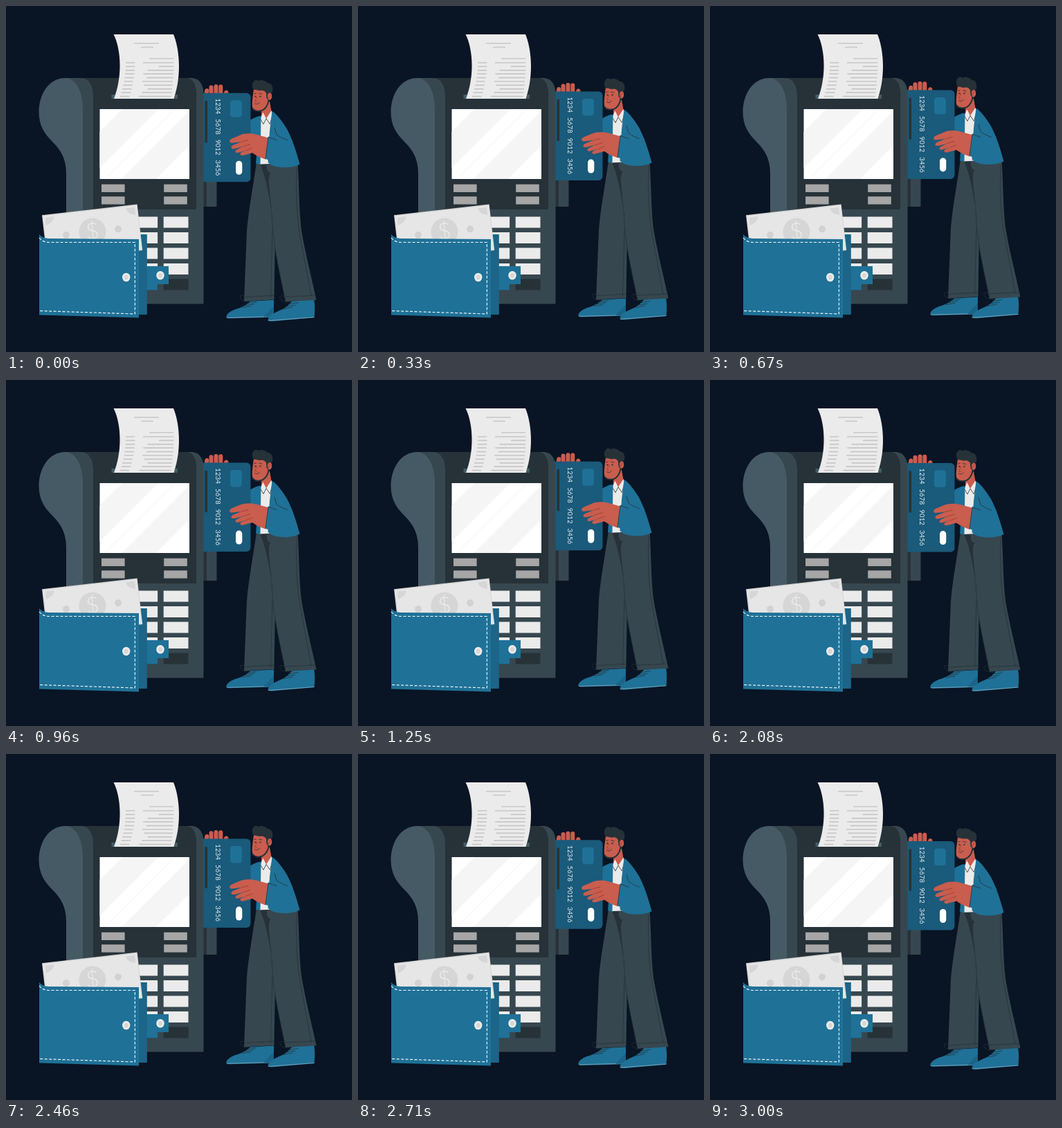
An HTML page for the animation above (3.04 s loop, 500 by 500 pixels).

```html
<!DOCTYPE html>
<html lang="en">
<head>
<meta charset="utf-8">
<title>Card payment</title>
<style>
  html, body { margin: 0; width: 100%; height: 100%; overflow: hidden; background: #091424; }
  svg { display: block; width: 100%; height: 100%; }
  .teal { fill: #1f7197; }
  .deep { fill: #1a5a7a; }
  .slate { fill: #37474f; }
  .dark { fill: #263238; }
  .pale { fill: #ebebeb; }
  .skin { fill: #c95d4e; }
  .line { fill: none; stroke: #263238; stroke-width: .8; stroke-linecap: round; stroke-linejoin: round; }
  .crease { fill: none; stroke: #8f3a33; stroke-width: .7; stroke-linecap: round; }
  .sole { fill: none; stroke: #a9c3d0; stroke-width: .6; }
  .number { font: 400 9.5px Lato, "Open Sans", sans-serif; letter-spacing: .2px; word-spacing: 4.2px; fill: #e4eef3; }
</style>
</head>
<body>
<svg viewBox="0 0 500 500">
  <defs>
    <clipPath id="glass"><rect x="135.500" y="149" width="129.500" height="101"/></clipPath>
  </defs>

  <!-- card reader arm -->
  <path class="slate" d="M285 200H304.500V290H285Z"/>
  <path class="dark" d="M285 200H290V290H285Z"/>

  <g id="man">
    <!-- shoes -->
    <path class="teal" d="M318.500 450.500C317 446 325 440 335 437.500C343 435 349 431 353 427L387 425V450L322 451.800Z"/>
    <path class="sole" d="M319 450.800L387 449"/>
    <path d="M372 449.500L387 434V449.500Z" fill="#1b6488"/>
    <path class="teal" d="M378.500 455C378 449 387 443.500 396 440C404 437 410 431 413 427L445 424C447 434 446 445 445.500 450.500L384 456Z"/>
    <path class="sole" d="M379 455L445.500 450"/>
    <path class="line" d="M341 436L354 434M345 433L358 431M349 430L362 428M347 427C337 426 337 418 341 418.500S348 424 350 428M401 438L414 435.500M405 434.500L418 432.500M409 431L422 429M405 428C394 427 394 418 399 419S406 425 408 429"/>

    <!-- trousers -->
    <path class="slate" d="M362 226L392 228L389 330L387.500 424.500L344 427L348 325C351 292 357 262 362 226Z"/>
    <path class="line" d="M385 325L382.500 421M345 421L387.500 418.500"/>
    <path class="slate" d="M366 226L421.500 227C424 262 423 290 427 325C433 360 442 394 448.500 425L404 427.500C397 392 387 350 385.500 322C382 290 379 252 366 226Z"/>
    <path class="dark" d="M367 228L377 230C376 236 378 240 383 242C376 245 383 275 384.500 305C381 276 376 250 367 228Z"/>
    <path class="line" d="M384 300L385.500 322C387 350 397 392 404 427.500M420 234C419 270 420 300 424 327L441 419M403 420.500L447 418.500"/>

    <!-- neck, shirt and jacket -->
    <path class="skin" d="M369 145L381 138L384 155L376 165L369 160Z"/>
    <path class="pale" d="M367 164L371.500 154L376 163L383.500 151.500L389 165L384 228L366 229Z"/>
    <path class="line" d="M367.500 163L372 171L376 163L381.500 171L385.500 156" stroke-width=".6"/>
    <path class="teal" d="M368.500 159C361 160 356 163 350 167V190L364 190L361 228L367.500 229.500Z"/>
    <path class="teal" d="M384.500 152C392 157 400 168 406 178C414 193 420 212 424.500 229C416 233 409 234 400 233.500C390 233 383 231 378.500 226L381 181Z"/>

    <!-- head -->
    <path class="skin" d="M358 119C357 130 354.500 142 356.500 148C359 152.500 368 153 373 149C377 146 379 141 379.500 137C385 136 386 127 381 125L376 117Z"/>
    <path class="line" stroke-width="2" style="stroke-width:2" d="M379.500 136C378.500 145 373 151.500 366.500 152C362 152.500 358.500 151 356.700 148.500"/>
    <path class="dark" d="M358.500 121.500C355 118 355 111 358.500 108.500C360 106.500 363 107 364.500 108.500C369 106 376 108 378 111.500C384 111 387 118 384.500 126C382 124 380 126 379.800 128L378.500 136L376.500 133L376 126C374 123 371 121.500 368 122.500C364 123 362 120.500 358.500 121.500Z"/>
    <ellipse class="skin" cx="381" cy="130.500" rx="3" ry="4.500"/>
    <path class="crease" d="M379.500 133C380 130 381 129 382.500 129"/>
    <circle class="dark" cx="360.500" cy="131" r="1.100"/>
    <circle class="dark" cx="367.500" cy="131" r="1.100"/>
    <path class="line" d="M358.500 127L361.500 126.500M365.500 126.500L370 127.500M359.500 141C362 143 365 142 366.500 139.500"/>
    <path class="crease" d="M363 131C361 135 360 137 360 138L362.500 138.500"/>

    <!-- far hand behind the card -->
    <path d="M289.500 128L290.200 122.500M296.500 128V117.800M303.500 128V116.500M310.300 128V116.800M317 128L318.300 125" fill="none" stroke="#c95d4e" stroke-width="6" stroke-linecap="round"/>

    <!-- card -->
    <rect class="deep" x="270" y="126" width="83.500" height="128.500" rx="6"/>
    <rect class="teal" x="324" y="136.500" width="16.800" height="24.500" rx="4"/>
    <rect x="332" y="224" width="9.300" height="20" rx="4.650" fill="#fff"/>
    <rect class="dark" x="287.500" y="137.500" width="3.500" height="60"/>
    <text class="number" transform="translate(302.800 133.800) rotate(90)">1234 5678 9012 3456</text>

    <!-- near arm -->
    <path class="skin" d="M380 191L362 186C353 184 345 184 338 187L326 192C321.500 194.500 322.500 198.500 327 198L340 196.500L328 201.500C323.500 204 325.500 207.500 330 206.500L342 203.500L333 208C329.500 211 332.500 213.500 336 212L347 209L340 211.800C336.500 214.500 339.500 217 343 216L356 212.500C362 217 369 220 375.500 222Z"/>
    <path class="crease" d="M340 196.500L350 194M342 203.500L353 200M347 209L356 205.500"/>
    <path class="teal" d="M398 170L379 190L375 221C383 225 392 227 400 227L414 195Z"/>
    <path class="line" d="M388 176L391 186C396 190 401 192 406.500 194M379 190L375 221M379 190L391 194"/>
  </g>

  <!-- terminal -->
  <path fill="#455a64" d="M86 104C60 104 47.500 130 47.500 153C47.500 172 55 184 66 195C79 208 87 220 87 243V330H126V104Z"/>
  <path class="slate" d="M86 104C102 105 111 125 111 147V330H140V104Z"/>
  <path class="slate" d="M108 104H267C280 104 285.500 114 285.500 127V430.500H126V130C126 115 120 104 108 104Z"/>
  <path class="dark" d="M108 104H260C270 104 275 113 275 126V294H126V130C126 115 120 104 108 104Z"/>
  <rect x="152.500" y="128" width="95.500" height="6" fill="#455a64"/>
  <path class="pale" d="M155.500 41H242C250 60 255 98 242.500 134H156C168 104 167 64 155.500 41Z"/>
  <path id="receipt" fill="none" stroke="#c7c7c7" stroke-width="1.700"/>
  <g clip-path="url(#glass)">
    <rect x="135" y="149" width="130" height="101" fill="#fff"/>
    <path fill="#f5f5f5" d="M168 149H220L118 251H66ZM268 149H318L216 251H166Z"/>
    <path d="M244 149L142 251" stroke="#f0f0f0" stroke-width=".8"/>
  </g>
  <g id="keys"></g>

  <!-- wallet back and strap -->
  <path class="teal" d="M200 402H219V410.500H200ZM200 376H235V402H200Z"/>
  <path d="M150 330H203.800V446H150Z" fill="#1c6589"/>

  <!-- banknote -->
  <g transform="translate(52 302.300) rotate(-6.600)">
    <rect width="138.500" height="67" fill="#d6d6d6"/>
    <rect x="1.500" y="1.500" width="136" height="64.500" fill="#e6e6e6"/>
    <path d="M4 4H17C16 10 11 14 4 15ZM134.500 4H121.500C122 10 127 14 134.500 15Z" fill="#d6d6d6"/>
    <circle cx="69.700" cy="32" r="19.500" fill="#d6d6d6"/>
    <circle cx="31.500" cy="32.500" r="5" fill="#d2d2d2"/>
    <circle cx="107" cy="32.500" r="5" fill="#d2d2d2"/>
    <text x="69.700" y="43" text-anchor="middle" font-family="Lato, sans-serif" font-weight="300" font-size="33" fill="#ededed">$</text>
  </g>

  <!-- wallet front -->
  <path class="teal" d="M48 330C52 335 58 336 64 336L192 337V450.500L48 446.500Z"/>
  <path d="M48 335C53 341 58 341.500 64 341.500H186.300V445L48 440.500" fill="none" stroke="#fff" stroke-width="1.100" stroke-dasharray="4 2.500"/>
  <g id="snaps"></g>
</svg>
<script>
  const el = id => document.getElementById(id);
  const rect = (x, y, w, h, fill) => `<rect x="${x}" y="${y}" width="${w}" height="${h}" fill="${fill}"/>`;
  const snap = (x, y) => `<ellipse cx="${x}" cy="${y}" rx="5.700" ry="6.300" fill="#ebebeb"/>` +
    `<ellipse cx="${x}" cy="${y}" rx="2.900" ry="3.400" fill="#d6d6d6"/>`;

  // Printed rows lean with the curl of the paper
  let rows = "M185 54H221M195 59.500H213M207 76H242";
  const inset = [0, 23, 7, 1, 6, 1, 4, 10, 3, 0];
  inset.forEach((gap, i) => {
    const y = 82 + i * 5.4, lean = i * i / 10;
    rows += `M${173 - lean} ${y}h13.500M${198 + gap - lean * .7} ${y}H${242.500 - lean * .5}`;
  });
  el("receipt").setAttribute("d", rows);

  let keys = "";
  for (const x of [138, 228.2])
    for (const y of [257.7, 275.3]) keys += rect(x, y, 33.6, 11.3, "#a6a6a6");
  for (const x of [138, 183.3, 227.7])
    for (let i = 0; i < 5; i++) keys += rect(x, 304.5 + i * 22.5, 35.8, 16, i < 4 ? "#ebebeb" : "#263238");
  el("keys").innerHTML = keys;
  el("snaps").innerHTML = snap(173.7, 392) + snap(223, 389.3);

  // Linear float up and back down
  const LOOP = 3040, LIFT = 9.8, LEAD = 40;
  function draw() {
    const phase = (performance.now() + LEAD) % LOOP / LOOP;
    const lift = LIFT * (1 - Math.abs(2 * phase - 1));
    el("man").setAttribute("transform", `translate(0 ${-lift})`);
    requestAnimationFrame(draw);
  }
  draw();
</script>
</body>
</html>
```
